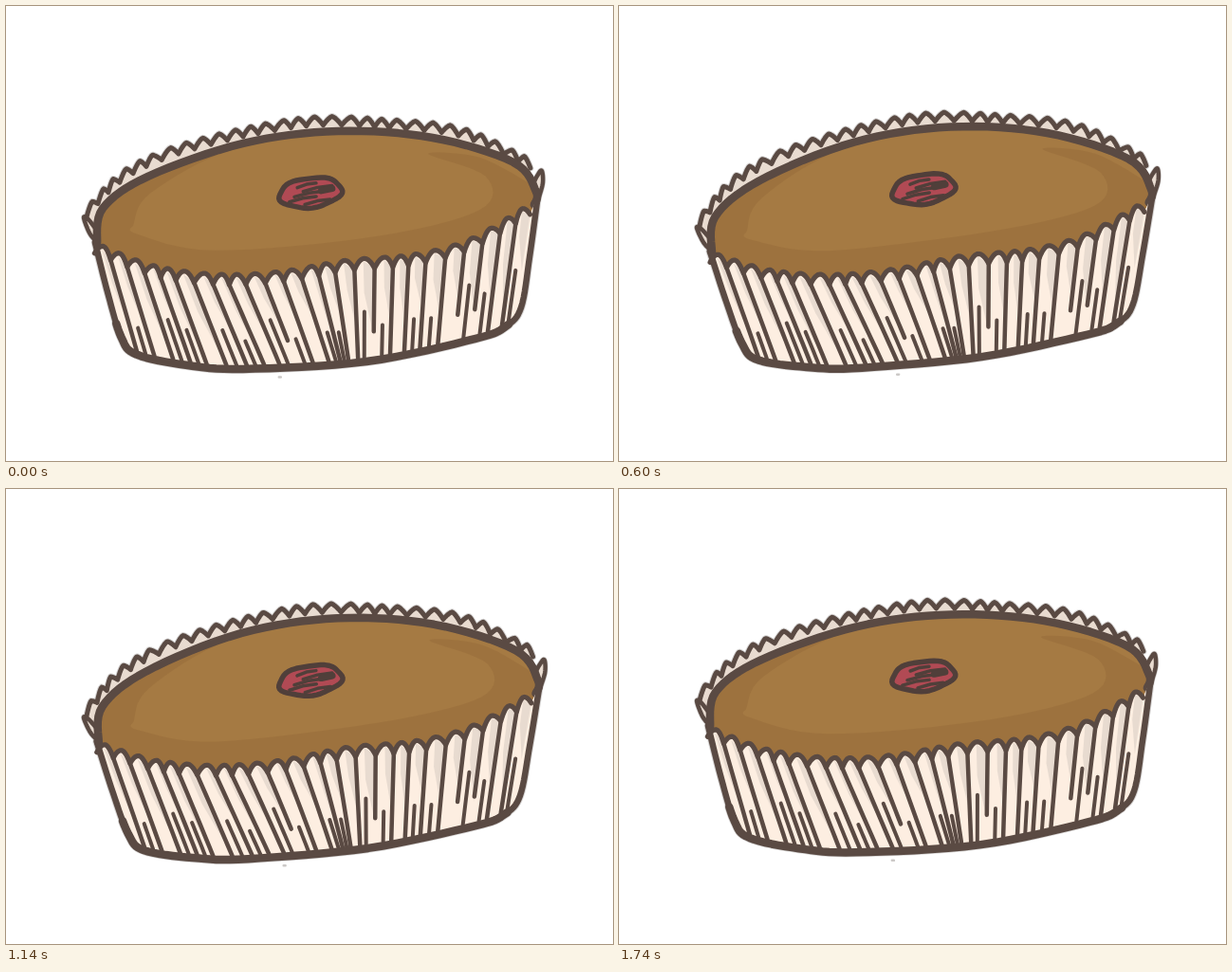
An HTML page with a canvas that plays this animation: 640x480 px, repeating every 1.77 s.

```html
<!DOCTYPE html>
<html>
<head>
<meta charset="utf-8">
<style>
html, body { margin: 0; width: 100%; height: 100%; overflow: hidden; background: #fff; }
canvas { display: block; }
</style>
</head>
<body>
<canvas id="stage" width="640" height="480"></canvas>
<script>
const ctx = document.getElementById('stage').getContext('2d');
const INK = '#5a4a43', PAPER = '#fdeee1', SHADE = '#e8dbd0', DARK = '#9d723e',
  LIGHT = '#a57a43', NUT = '#b14a54', NUT_INK = '#503f3a', FRINGE = '#d6d4d3';
const LOOP = 1770, STEP = 30;

const mix = (a, b, f) => a + (b - a) * f;
const mixPt = (a, b, f) => [mix(a[0], b[0], f), mix(a[1], b[1], f)];

let seed = 11;
const rand = (lo, hi) => mix(lo, hi, (seed = seed * 16807 % 2147483647) / 2147483647);

// Catmull-Rom curve through x, y, x, y, ...
function smooth(...flat) {
  const n = flat.length / 2, out = [];
  const at = i => flat.slice(2 * i, 2 * i + 2);
  for (let i = 0; i < n - 1; i++) {
    const b = at(i), c = at(i + 1), a = i ? at(i - 1) : b, d = i < n - 2 ? at(i + 2) : c;
    for (let t = 0; t < 1; t += .125)
      out.push([0, 1].map(k => b[k] + t / 2 * (c[k] - a[k] + t * (2 * a[k] - 5 * b[k] + 4 * c[k] - d[k]
        + t * (3 * (b[k] - c[k]) + d[k] - a[k])))));
  }
  out.push(at(n - 1));
  return out;
}

// slightly uneven steps along a line
function walk(line, gap) {
  const out = [line[0]];
  let left = gap;
  for (let i = 1; i < line.length; i++) {
    const a = line[i - 1], b = line[i], len = Math.hypot(b[0] - a[0], b[1] - a[1]);
    let pos = left;
    for (; pos <= len; pos += gap * rand(.8, 1.2)) out.push(mixPt(a, b, pos / len));
    left = pos - len;
  }
  return out;
}

// value at x on a line sorted by x
function lookup(p, x) {
  let i = 1;
  while (i < p.length - 1 && p[i][0] < x) i++;
  return mix(p[i - 1][1], p[i][1], (x - p[i - 1][0]) / (p[i][0] - p[i - 1][0]));
}

// a scalloped edge with its tips and the valleys on both sides of them
function teeth(path, gap, depth, power) {
  const tips = walk(path, gap), n = tips.length, line = [];
  const ends = [mixPt(tips[1], tips[0], 2), ...tips, mixPt(tips[n - 2], tips[n - 1], 2)];
  const valleys = ends.slice(1).map((p, i) => {
    const [x, y] = mixPt(ends[i], p, .5);
    return [x, y + depth];
  });
  tips.forEach((tip, i) => {
    for (let s = -1; s <= 1; s += .125) {
      const v = valleys[s < 0 ? i : i + 1], f = Math.abs(s);
      line.push([mix(tip[0], v[0], f), mix(tip[1], v[1], f ** power)]);
    }
  });
  return { line, tips, valleys };
}

const rim = smooth(96, 252, 102, 214, 150, 180, 250, 145, 350, 132, 450, 139, 535, 165, 559, 196, 557, 210);
const shell = smooth(94, 250, 108, 305, 122, 350, 138, 368, 190, 379, 250, 383, 380, 375, 495, 351,
  527, 338, 543, 318, 552, 265, 561, 200);
const base = shell.filter(p => p[1] > 335);
const back = teeth(smooth(91, 207, 127, 172, 195, 143, 312, 118, 407, 120, 482, 129, 549, 160), 18, 9, 1.4);
const front = teeth(smooth(102, 254, 155, 274, 222, 283, 290, 280, 360, 268, 430, 262, 490, 246, 553, 209), 18.5, 11, 2);
const leftTip = smooth(96, 250, 88, 240, 82, 224, 87, 226, 96, 238);
const rightTip = smooth(556, 188, 560, 180, 565, 174, 566, 188, 560, 208);

// the folds run sideways from the top edge to the base
const lean = [[93, 27], [240, 38], [320, 28], [375, 0], [560, -17]];
function fold(top, f) {
  const x = top[0] + lookup(lean, top[0]);
  return [mix(top[0], x, f), mix(top[1], lookup(base, x) - 2, f)];
}
const foldLine = (top, from, to) =>
  Array.from({ length: 9 }, (_, i) => fold(top, mix(from, to, i / 8)));

// a spot inside the nut, u and v from -1 to 1
const nutPt = (u, v) => [321 + 33 * u + 2 * v, 197 + 15.5 * v - 4 * u];

const layers = [];
const add = (line, fill, ink, width) => layers.push({ line, fill, ink, width });

for (const [line, width] of [[back.line, 7], [shell, 8.5], [base, 10], [leftTip, 6], [rightTip, 6]])
  add(line, null, FRINGE, width);
add([...back.line, ...[...rim].reverse()], SHADE);
add(back.line, null, INK, 5);
add(leftTip, SHADE, INK, 4.5);
add(rightTip, SHADE, INK, 4.5);

add([...rim, ...[...front.line].reverse()], DARK);
add(smooth(134, 232, 152, 198, 240, 151, 360, 134, 500, 151, 554, 188, 500, 160, 445, 156,
  506, 180, 500, 215, 390, 243, 220, 258, 138, 241, 134, 232), LIGHT);
add(rim, null, INK, 8.5);

const husk = Array.from({ length: 49 }, (_, i) => {
  const a = i * Math.PI / 24, r = 1 + .04 * Math.sin(5 * a);
  return nutPt(r * Math.cos(a), r * Math.sin(a));
});
add(husk, NUT, NUT_INK, 5.5);
for (let v = -.6; v < .7; v += .3) {
  const u = rand(-.7, -.2), end = u + rand(.6, 1);
  add([nutPt(u, v + .15), nutPt((u + end) / 2, v), nutPt(end, v)], null, NUT_INK, 3.5);
}
add([nutPt(.35, -.05), nutPt(.7, -.1)], null, NUT_INK, 7);

add([...front.line, ...[...shell].reverse()], PAPER);
front.tips.forEach((tip, i) => {
  const v = front.valleys[i + 1], end = rand(.5, .95);
  add([[tip[0] - 1, tip[1] + 3], v, fold(v, end), fold(tip, end * .45)], SHADE);
});
front.valleys.slice(1, -1).forEach((v, i) => {
  const next = front.valleys[i + 2];
  add(foldLine(v, 0, rand(.75, 1.15) > .85 ? .98 : .7), null, INK, 4.5);
  if (i % 3 != 1) add(foldLine(mixPt(v, next, .5), rand(.4, .7), .98), null, INK, 4);
});
add(front.line, null, INK, 5.2);
add(shell, null, INK, 6.5);
add(base, null, INK, 8.5);
add([[288, 391.5], [290, 391.5]], null, '#ccc9c7', 2.5);

// one bob of the body, two flaps of the ends per loop
function pose(t) {
  const a = 2 * Math.PI * t / LOOP, c = Math.cos(a), s = Math.sin(a), c2 = Math.cos(2 * a), s2 = Math.sin(2 * a);
  return {
    lift: 4.75 * c2 - 4.5 * (c + s) - .25,
    droop: 6.5 + 7.5 * c - 14.5 * c2 + 1.5 * s2,
    tilt: 4.3 - c - 3.5 * c2
  };
}

function bend([x, y], { lift, droop, tilt }) {
  const u = (x - 320) / 240, angle = (2 * droop * u - tilt) / 240;
  const stretch = droop * (.33 - .007 * droop);
  return [x - .8 * angle * (y - 195) + stretch * u, y + lift + droop * u * u - tilt * u];
}

function draw(now) {
  const state = pose(Math.floor(now % LOOP / STEP) * STEP);
  ctx.fillStyle = '#fff';
  ctx.fillRect(0, 0, 640, 480);
  ctx.lineCap = ctx.lineJoin = 'round';
  for (const { line, fill, ink, width } of layers) {
    ctx.beginPath();
    for (const p of line) ctx.lineTo(...bend(p, state));
    if (fill) { ctx.fillStyle = fill; ctx.fill(); }
    if (ink) { ctx.strokeStyle = ink; ctx.lineWidth = width; ctx.stroke(); }
  }
}

const start = performance.now();
function tick() {
  draw(performance.now() - start);
  requestAnimationFrame(tick);
}
tick();
</script>
</body>
</html>
```
